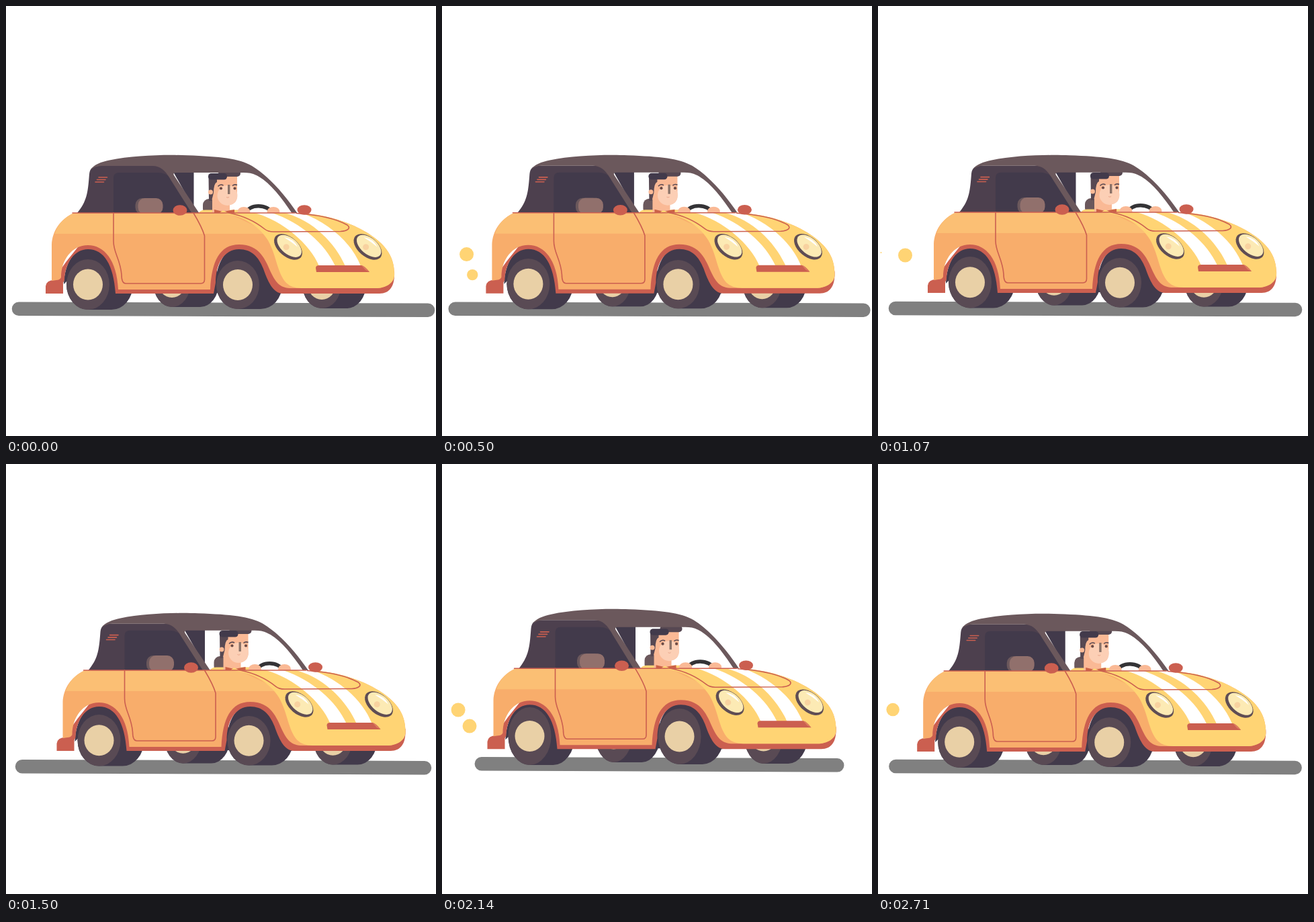
An HTML page for the animation above (2780 ms loop, 640 px wide and 640 px high).

```html
<!DOCTYPE html>
<html lang="en">
<head>
<meta charset="utf-8">
<title>Yellow car</title>
<style>
html, body { margin: 0; width: 100%; height: 100%; overflow: hidden; background: #fff; }
svg { display: block; width: 100vw; height: 100vh; }
.line { fill: none; stroke: #cb5f50; stroke-width: 1.6; stroke-linecap: round; stroke-linejoin: round; }
.dark { fill: #423a4b; }
.brown { fill: #6b585c; }
.red { fill: #cb5f50; }
.skin { fill: #fab995; }
.sun { fill: #ffd474; }
.white { fill: #fff; }
</style>
</head>
<body>
<svg viewBox="0 0 640 640">
  <path id="road" fill="none" stroke="#808080" stroke-width="20.5" stroke-linecap="round"/>
  <g id="smoke" class="sun"></g>
  <g id="car">
    <g id="far"></g>
    <g class="lift dark">
      <path d="M86 414C87 384 101 360 122 360C147 360 160 385 163 427L150 427L100 400Z"/>
      <path d="M311 427C311 386 324 360 347 360C374 360 385 390 392 408L410 428Z"/>
    </g>
    <g id="near"></g>
    <g class="lift">
      <!-- driver -->
      <rect x="293" y="287" width="20" height="24" rx="9" class="brown"/>
      <path d="M287 309Q288 303.500 297 303.500H345L352 309Z" class="sun"/>
      <path d="M307 270H333V309H307Z" class="skin"/>
      <path d="M310 309V303L323 306L340 303V309Z" fill="#cb6247"/>
      <path d="M316 309L323 304L333 309Z" class="sun"/>
      <path d="M306 250H344V282Q344 296 330 296Q317 296 312 288L306 288Z" class="skin"/>
      <circle cx="329.500" cy="282" r="15" fill="#fccfb5"/>
      <path d="M301.500 254H314V262Q309 264 309 278L306 290H302Z" fill="#574852"/>
      <circle cx="304.500" cy="277" r="3.500" class="skin"/>
      <rect x="316" y="244" width="33" height="10" rx="5" fill="#574852"/>
      <rect x="301" y="249" width="28" height="9.500" rx="4.500" class="dark"/>
      <rect x="330" y="266" width="3.400" height="14" fill="#8a7268"/>
      <circle cx="320" cy="271.500" r="2.100" fill="#6b4a45"/>
      <circle cx="340.500" cy="271.500" r="2.100" fill="#6b4a45"/>
      <path d="M315.500 268.500Q319 264.500 323.500 267M337 267.500Q340 264.800 344 266.500" fill="none" stroke="#574852" stroke-width="1.600"/>
      <path d="M328 284.500Q330 286 332 284.500" fill="none" stroke="#e8a58a"/>
      <path d="M357 309C360 294 391 294 396 309" fill="none" stroke="#343336" stroke-width="5.500"/>
      <ellipse cx="354" cy="306" rx="9.500" ry="7" class="skin"/>
      <ellipse cx="398" cy="306" rx="9.500" ry="7" class="skin"/>
      <!-- roof -->
      <g id="roof">
        <path d="M249 247H279.500V300L284 309Z" class="dark"/>
        <path d="M106 308C121 290 122 276 124 250C125 241 130 238 138 238H232L284 308Z" fill="#4d404e"/>
        <path d="M160 308V256Q160 248 168 248H226Q239 248 245 257L277 308Z" class="dark"/>
        <path d="M126 244C130 236 142 232 154 229.500C190 222 240 221 270 222.300C318 224 347 227 366 238C392 254 415 281 434 309H426C408 282 388 257 368 250C362 248 356 248 348 248H253Q248 248 250 252L288 309H277L246 260C238 246 231 238 218 238H142Q132 238 126 244Z" class="brown"/>
        <path class="line" d="M138 255H150.500M135.500 258.500H148M133 262H145.500"/>
      </g>
      <rect x="192.500" y="286" width="36" height="24" rx="10" class="brown"/>
      <rect x="196.500" y="286" width="37" height="24" rx="10" fill="#91706c"/>
      <!-- shell -->
      <path class="red" d="M70 408L90 380L122 340H347L420 400L578 395C579 416 572 428 556 428H412C397 428 389 408 383 391C376 373 365 362 347 362C324 362 312 385 312 412L309 428H163C160 385 146 362 122 362C102 362 88 382 87 408L85 412V428H59V417Q60 408 72 408Z"/>
      <path fill="#f8ad6b" d="M68 409V355C69 335 80 318 101 308H432C500 310 550 340 566 362C575 374 578 386 578 400C578 412 566 420 550 420H425C408 420 402 412 395 398C386 378 378 355 347 355C318 355 306 380 304 422H167C165 378 146 356 122 356C98 356 82 378 82 404Q80 408 75 408Z"/>
      <path fill="#fbbf74" d="M72.500 339C77 325 86 315 101 308H330L395 339Z"/>
      <path class="sun" d="M315 308C350 310 376 326 390 349C403 372 403 396 417 412Q425 420 440 420H550C566 420 578 412 578 400C578 386 575 374 566 362C550 340 500 310 432 308Z"/>
      <path class="white" d="M370 308H396C440 323 475 354 490 387H466C453 355 412 319 370 308Z"/>
      <path class="white" d="M415 308H440C482 323 515 354 528 387H505C490 353 457 319 415 308Z"/>
      <path class="line" d="M99 308H430"/>
      <path class="line" d="M160 308V350C160 368 170 376 172 400Q172 413 178 413H290Q295.500 413 295.500 407V342C292 330 285 318 279 308"/>
      <path class="line" d="M332 308C352 312 370 320 385 332Q390 336 398 336L498 335.500C508 335 514 331 508 326C494 318 468 311 432 308.500"/>
      <path class="red" d="M462 396L461 390Q461 386 466 386H529Q534 387 541 396Z"/>
      <path d="M529 386Q534 387 541 396L535 393Z" fill="#dc7c5e"/>
      <g id="lamps"></g>
      <ellipse cx="259" cy="304" rx="10.500" ry="7.800" class="red"/>
      <ellipse cx="444" cy="303.500" rx="10.500" ry="7.300" class="red"/>
    </g>
  </g>
</svg>
<script>
const LOOP = 2780, STEPS = 39, BOUNCES = 6, PUFF = 1470;
const $ = id => document.getElementById(id);

function add(parent, tag, attrs) {
  const el = document.createElementNS("http://www.w3.org/2000/svg", tag);
  parent.appendChild(el);
  return set(el, attrs);
}
function set(el, attrs) {
  for (const k in attrs) el.setAttribute(k, attrs[k]);
  return el;
}

// Smooth closed curve through [position, value] keys
function ring(keys, p, period) {
  const n = keys.length;
  const at = i => {
    const k = keys[(i + n) % n];
    return [k[0] + Math.floor(i / n) * period, k[1]];
  };
  let i = n - 1;
  while (i > 0 && keys[i][0] > p) i--;
  const [a, b, c, d] = [at(i - 1), at(i), at(i + 1), at(i + 2)];
  const w = c[0] - b[0], u = (p - b[0]) / w;
  const m = (c[1] - a[1]) / (c[0] - a[0]) * w;
  const q = (d[1] - b[1]) / (d[0] - b[0]) * w;
  const u2 = u * u, u3 = u2 * u;
  return (2 * u3 - 3 * u2 + 1) * b[1] + (u3 - 2 * u2 + u) * m
    + (3 * u2 - 2 * u3) * c[1] + (u3 - u2) * q;
}

// Straight track through [time, x, y, r] keys
function track(keys, t) {
  const i = keys.findIndex(k => k[0] > t);
  if (i < 1) return [0, 0, 0, 0];
  const a = keys[i - 1], b = keys[i], u = (t - a[0]) / (b[0] - a[0]);
  return a.map((v, j) => v + (b[j] - v) * u);
}

const drive = [[0, 0], [290, 2], [710, 11], [1070, 15], [1500, 16.5], [2140, 8.5], [2710, -0.8]];
const phases = [0, 0.237, 0.309, 0.532, 0.619, 0.849];
const bounce = (...v) => v.map((y, i) => [phases[i], y]);
const squeeze = bounce(0, 0.13, 0.18, 0.94, 1, 0.18);
const lift = bounce(0, -1, -1, -2, -3.8, 0);
const roofLift = bounce(0, 0, 0, -4, -6, 1);
const tyreLift = bounce(0, -2.5, -2.5, -2.5, -4, 0);
const hubLift = bounce(0, -3.3, -3.3, -8, -9.5, -0.8);

const puffs = [
  [[60, 58, 424, 0], [290, 42, 380, 10.5], [480, 38, 370, 10.5], [670, 24, 366, 10.5],
   [710, 22, 365.5, 9.7], [1070, 4.5, 367, 1], [1110, 4, 367, 0]],
  [[200, 55, 422, 0], [290, 50.5, 412.5, 5.3], [670, 41, 390, 10.5], [710, 41.5, 387, 10.5],
   [1070, 40.5, 371, 10.5], [1240, 22, 365.5, 9.7], [1450, 4, 367, 0]]
].map(keys => ({ keys, el: add($("smoke"), "circle", {}) }));

function wheel(group, x, rx, cy, bottom, length) {
  const g = $(group);
  return {
    cy, bottom,
    tread: add(g, "rect", { x: x - rx, width: length, rx, fill: "#423a4b" }),
    side: add(g, "ellipse", { cx: x, rx, fill: "#594a54" }),
    hub: add(g, "ellipse", { cx: x, rx: group === "near" ? 22 : 21, ry: 23, fill: "#e9d0a6" })
  };
}
const wheels = [
  wheel("far", 247, 28, 411, 448, 98),
  wheel("far", 470, 29, 414, 450, 95),
  wheel("near", 122, 32, 414.5, 452, 99),
  wheel("near", 345, 32, 415, 451, 98)
];

for (const x of [420, 538.5]) {
  const g = add($("lamps"), "g", { transform: `translate(${x} 358.5) rotate(40)` });
  add(g, "ellipse", { rx: 24.5, ry: 14.5, fill: "#5f4d54" });
  add(g, "ellipse", { cx: 0.5, cy: -2, rx: 21.5, ry: 12, fill: "#fceab4" });
  add(g, "circle", { cx: -2, cy: 2, r: 4.5, fill: "#f8d2a0" });
  add(g, "path", { d: "M-14 -7Q-2 -15 11 -9Q-2 -9 -14 -7Z", fill: "#fff" });
}

const lifted = document.querySelectorAll(".lift");

function draw(t) {
  const beat = t / LOOP * BOUNCES;
  const amp = beat < 1 ? 0.82 : 1;
  const val = keys => ring(keys, beat % 1, 1) * amp;

  const s = val(squeeze), half = 304.5 - 39.5 * s, y = 450.8 - 4.4 * s;
  set($("road"), { d: `M${323.5 - half} ${y}L${323.5 + half} ${y + 2}` });

  set($("car"), { transform: `translate(${ring(drive, t, LOOP)} 0)` });
  const dy = val(lift);
  lifted.forEach(g => set(g, { transform: `translate(0 ${dy})` }));
  const stretch = 1 + (dy - val(roofLift)) / 86;
  set($("roof"), { transform: `translate(0 308) scale(1 ${stretch}) translate(0 -308)` });

  for (const w of wheels) {
    const cy = w.cy + val(hubLift), ry = w.bottom + val(tyreLift) - cy;
    set(w.tread, { y: cy - ry, height: 2 * ry, ry });
    set(w.side, { cy, ry });
    set(w.hub, { cy });
  }
  for (const p of puffs) {
    const [, cx, cy, r] = track(p.keys, t % PUFF);
    set(p.el, { cx, cy, r });
  }
}

const start = performance.now();
function tick() {
  const t = (performance.now() - start) % LOOP;
  const step = Math.floor((t + 4) / LOOP * STEPS) % STEPS;
  draw(step * LOOP / STEPS);
  requestAnimationFrame(tick);
}
tick();
</script>
</body>
</html>
```
